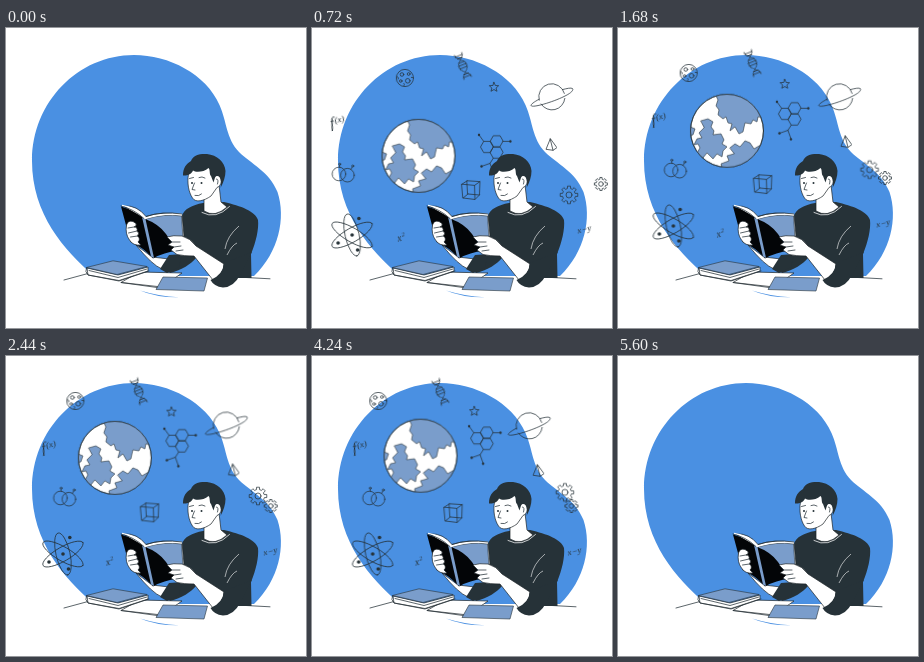
An HTML page that plays this animation: 300x300 px, repeating every 6000 ms.

```html
<!DOCTYPE html>
<html lang="en">
<head>
<meta charset="utf-8">
<title>Reading and imagining</title>
<style>
html, body { margin: 0; width: 100%; height: 100%; overflow: hidden; background: #fff; }
svg { display: block; width: 100vw; height: 100vh; }
.line { fill: none; stroke: #263238; stroke-width: .75; stroke-linecap: round; stroke-linejoin: round; }
.ink { fill: #263238; stroke: none; }
.dark { fill: #263238; }
.black { fill: #030507; }
.skin { fill: #fff; stroke: #1c2327; stroke-width: .7; stroke-linejoin: round; }
.soft { fill: #7a9dcb; stroke: #263238; stroke-width: .6; stroke-linejoin: round; }
text { font-family: "Liberation Serif", "Noto Serif", serif; font-style: italic; fill: #263238; stroke: none; }
.item { animation: fly 6s infinite, fade 6s linear infinite; }
@keyframes fly {
  0% {
    transform: translate(var(--ax), var(--ay)) scale(1);
    animation-timing-function: cubic-bezier(.333, 1, .667, 1);
  }
  25% {
    transform: translate(var(--bx), var(--by)) scale(1);
    animation-timing-function: linear;
  }
  73.33% {
    transform: translate(var(--cx), var(--cy)) scale(1);
    animation-timing-function: cubic-bezier(.333, 0, .667, .333);
  }
  93.33%, 100% { transform: translate(var(--dx), var(--dy)) scale(.36); }
}
@keyframes fade {
  0% { opacity: 0; }
  9%, 83% { opacity: 1; }
  92%, 100% { opacity: 0; }
}
</style>
</head>
<body>
<svg viewBox="0 0 300 300">
  <defs>
    <clipPath id="disc"><circle r="36.5"/></clipPath>
    <path id="hex" d="M6.4 0 3.2 5.6H-3.2L-6.4 0-3.2-5.6H3.2Z"/>
  </defs>

  <path fill="#4a90e2" d="M128 27C163 27 200 46 213.5 77C221 94 220 110 233 124C245 136 263 143 271.5 164C280 190 273 224 248 248H88C58 222 26 186 26 133C26 74 72 27 128 27Z"/>
  <path fill="#4a90e2" d="M134 262.5Q152 268 173 269.3Q150 269.5 134 262.5Z"/>

  <!-- floating ideas: each data-path lists four waypoints -->
  <g class="line">
    <g class="item" data-path="106.5,128 109,103 108.5,99.5 99,82">
      <circle r="36.5" fill="#fff"/>
      <g clip-path="url(#disc)" fill="#7a9dcb" stroke-width=".6">
        <path d="M-12-37 -9-31 -11-25 -8-21 -9-16 -4-12 -1-14 1-8 5-7 3 0 8-4 12 3 16 1 18-8 24-7 26-11 30-9 31-14 40-13V-40Z"/>
        <path d="M3 17 8 13 13 16 18 10 23 12 27 18 34 14 40 15V40H-4L-6 33 2 30 0 25 7 23Z"/>
        <path d="M-26-10 -19-12 -14-9 -16-4 -13 0 -14 4 -6 3 -3 9 -5 13 0 16 -4 20 -5 26 -10 23 -14 28 -20 22 -24 27 -31 24 -27 17 -29 13 -33 14 -30 8 -25 7 -28 2 -23-3Z"/>
        <path d="M-37-4 -32-2 -34 4 -40 5Z"/>
      </g>
      <circle r="36.5"/>
    </g>

    <g class="item" data-path="93,50 71,45 66,45 50,48">
      <circle r="8.6"/>
      <circle cx="-3" cy="-3.5" r="1.8"/><circle cx="3.7" cy="-4" r="1.4"/>
      <circle cx="2.8" cy="2.8" r="2.3"/><circle cx="-4.2" cy="3" r="1.3"/>
      <path d="M-7.8-1.4q2 .6 1.2 2.4M-1 5.4q1 1 0 2.4M6.4-.6l1.2.2"/>
    </g>

    <g class="item" data-path="151,38 135,35 128,36 111,39">
      <g transform="rotate(-22)">
        <path d="M-4-13C-4-6 4-7 4 0S-4 6-4 13M4-13C4-6-4-7-4 0S4 6 4 13"/>
        <path d="M-3.8-11H3.8M-2.5-8.5H2.5M-3-4H3M-4-1.2H4M-3.8 1.8H3.8M-2.5 8.5H2.5M-3.8 11H3.8"/>
      </g>
    </g>

    <g class="item" data-path="182,59 167,56 162,55 153,57">
      <path d="M0-4.7 1.4-1.5 4.7-1.3 2.1 1 3 4.3 0 2.5-3 4.3-2.1 1-4.7-1.3-1.4-1.5Z"/>
    </g>

    <g class="item" data-path="240,69 222,69 217,70 207,71">
      <path d="M-12.8 3.2A13 13 0 1 1 12.4-3.6M-10.9 7A13 13 0 0 0 12.9 1.4"/>
      <path d="M-12.8 2.2C-19 5.5-22 8-20.5 9C-17 10.5 4 4 14-1.5C19-4 22-7 20.5-8.5C19-9.5 15-8.5 10.5-7.4"/>
    </g>

    <g class="item" data-path="24,93 39,90 47,90 57,90">
      <g transform="rotate(-12)">
        <text x="-6.5" y="5.5" font-size="15">f</text>
        <text x="-1.4" y="2.4" font-size="9">(x)</text>
      </g>
    </g>

    <g class="item" data-path="31,146 57,142 62,142 74,143">
      <circle cx="-4.2" cy="0" r="6.8"/><circle cx="4.3" cy="1.2" r="6.8"/>
      <path d="M-3.5-6.8v-2M7.8-4.7l1.3-2.3"/>
      <circle cx="-3.5" cy="-9.8" r="1"/><circle cx="9.6" cy="-8" r="1"/>
    </g>

    <g class="item" data-path="40,207 55,198 61,198 70,197">
      <ellipse rx="23" ry="7" transform="rotate(30)"/>
      <ellipse rx="21.5" ry="7" transform="rotate(77)"/>
      <ellipse rx="23" ry="7" transform="rotate(-30)"/>
      <g class="ink"><circle r="1.8"/><circle cx="6.8" cy="-16.5" r="1.8"/><circle cx="5.5" cy="15" r="1.8"/><circle cx="-14" cy="8" r="1.8"/></g>
    </g>

    <g class="item" data-path="89,209 102,205 107,205 115,207">
      <g transform="rotate(-12)">
        <text x="-4" y="4.2" font-size="9.5">x</text><text x="1" y="-.2" font-size="6">2</text>
      </g>
    </g>

    <g class="item" data-path="180,124 172,91 170,87 160,78">
      <use href="#hex" x="-5.1" y="-4.9"/><use href="#hex" x="4.5" y="-10.5"/><use href="#hex" x="4.5" y=".7"/>
      <path d="M-8.3-10.5-13-17M10.9-10.5H18M1.3 6.3-2 11.5-10.5 14.5M-2 11.5 1 20"/>
      <g class="ink"><circle cx="-13" cy="-17" r="1.2"/><circle cx="18.4" cy="-10.5" r="1.2"/><circle cx="-10.5" cy="14.5" r="1.2"/><circle cx="1" cy="20.5" r="1.2"/></g>
    </g>

    <g class="item" data-path="159,162 145,156 141,157 131,159">
      <path d="M-9-5.8 3.6-4.6 4 9.5-7.8 8ZM-3.8-9.2 9-8.4 8.5 5-3 4ZM-9-5.8-3.8-9.2M3.6-4.6 9-8.4M4 9.5 8.5 5M-7.8 8-3 4"/>
    </g>

    <g class="item" data-path="239,117 228,114 226,115 218,116">
      <path d="M-.8-6-5 4.3 2 5.3 5.6 2.9ZM-.8-6 2 5.3"/>
    </g>

    <g class="item" data-path="257,167 251.5,142 253,136 256,121">
      <path data-gear="8.9"/><circle r="3"/>
    </g>
    <g class="item" data-path="289,156 267.5,150 259,150 243,153">
      <path data-gear="6.6"/><circle r="2.3"/>
    </g>

    <g class="item" data-path="272,201 265,195 262,195 256,198">
      <g transform="rotate(-14)">
        <text x="-7" y="3" font-size="9">x</text><text x="-2.4" y="3" font-size="9">−</text><text x="3.2" y="3" font-size="9">y</text>
      </g>
    </g>
  </g>

  <!-- desk -->
  <path class="line" d="M58 252 82 245.5M142 245.5 160 247M212 248 264 250.8"/>
  <path class="skin" d="M133 244 176 245 156 259 115 254.5Z"/>
  <path class="soft" d="M157 249 201.5 250 198 263 150 261.5Z"/>
  <path class="line" stroke-width=".6" d="M115 254.5 151 259.5"/>

  <!-- closed book -->
  <path class="skin" d="M81 240 112 247 142 239V243L113 252.5 82 247Z"/>
  <path class="soft" d="M80.5 239.5 107 232.8 141 238.5 111 246.5Z"/>
  <path class="line" stroke-width="1" d="M80.5 239.5Q78.5 244 82 247L113 253 143 243"/>
  <path class="line" stroke-width=".6" d="M83 242.5 112 249.5 141 241"/>

  <!-- reader -->
  <path class="dark" d="M197 175C186 177 178 181 176 188L174 224C178 229 171 236 160 239L164 245C176 242 185 236 190 230L212 250H245.5L245 226C250 214 253 201 252 192C249 183 235 178 218 174Z"/>
  <path d="M219 221Q221 208 233 198M221 227Q226 217 231 215" fill="none" stroke="#fff" stroke-width=".6"/>
  <path class="skin" d="M198 167V183Q209 190 221 179L215 174 213 157Z"/>
  <path class="line" stroke="#fff" style="stroke:#fff" d="M196 184.5Q210 192 223.5 178.5"/>
  <path class="skin" d="M182.5 146C181 155 182.5 164 186.5 170C189.5 175 198 173 205 168L211 159.5C216 158 217 149 212 147L206 138 186 138Z"/>
  <path class="dark" d="M177 147.5C177 140 180 136 185 133C187 127 194 125.5 201 126C211 127 219 134 219.5 143C219.5 149 217.5 154 214.5 160C216 154 214.5 147 210.5 148C208.5 149 208.5 152 207.5 154.5L205 148C203 146 204.5 142 202.5 140C198 144 190 145 187 142.5C186 146 181 148 177 147.5Z"/>
  <g class="line" stroke-width=".8">
    <path d="M183.5 150.5 187.5 149.5M193 149.5Q196 148 199 150M188.5 155 186 161.5 189 162M189 167.5Q193 168.5 195.5 166M210.5 151Q213 151 211.5 156"/>
    <circle class="ink" cx="186" cy="155" r="1"/><circle class="ink" cx="195.5" cy="155" r="1"/>
  </g>

  <!-- far forearm -->
  <path class="skin" d="M130 217 146 229 163 231 165 240 156 241Q146 237 130 217Z"/>
  <path class="dark" d="M154 241 163 227 176 226 173 239 161 245Z"/>

  <!-- open book -->
  <path class="skin" d="M118 178Q131 177 140 188.5Q156 183 176 186.5L178 208 162 214 141 196Z"/>
  <path class="soft" d="M140 191Q158 185.5 175.5 188L177 210 162 214Z"/>
  <path class="black" d="M115 178.5Q127 182 138 190.5L147 230.5Q137 219 124.5 214Z"/>
  <path class="black" d="M138 190.5Q153 196 160 206L171.5 223Q158 224 147 230.5Z"/>
  <path fill="#7a9dcb" d="M136 189 139.5 191 148 230 145 228.5Z"/>
  <path d="M116 177.5Q129 179 139 190.5Q157 184.5 176 186.5" fill="none" stroke="#fff" stroke-width="1.3"/>
  <path class="line" stroke-width=".6" d="M115 178Q128 181 138 190.5M140 188.5Q156 183 176 186"/>

  <!-- hands and near forearm -->
  <path class="skin" d="M120.5 197Q122 192 127 193.5L130 195.5Q131 198 128 199Q132 199 131 203Q134 205 131.5 208Q135 211 132 214L135 217Q127 218 123.5 212Q119 206 120.5 197Z"/>
  <path class="line" stroke-width=".6" d="M122 200 128 199M122.5 205 131 203M124.5 209 131.5 208"/>
  <path class="skin" d="M161 209Q167 207 176 208Q184 210 190 218L218 236Q218 246 207 252L188 228Q178 228 171 226.5L165 222 168 219 162 217 166 214Z"/>
  <path class="line" stroke-width=".6" d="M166 214 174 214M168 219 175 218M170 223 177 222"/>
  <path class="dark" d="M218 235 246 224 234 247Q228 259 217 259.5Q208 258.5 204.5 252Q217 247 218 235Z"/>
</svg>
<script>
const lerp = (from, to, k) => from + (to - from) * k;

// The second and third waypoints are the resting drift; the outer two set entry and exit.
for (const item of document.querySelectorAll('.item')) {
  const [early, rest, drift, late] = item.dataset.path.split(' ').map(p => p.split(',').map(Number));
  ['x', 'y'].forEach((axis, i) => {
    const set = (name, value) => item.style.setProperty(`--${name}${axis}`, `${value}px`);
    set('a', lerp(rest[i], early[i], 7.1));
    set('b', rest[i]);
    set('c', drift[i]);
    set('d', lerp(drift[i], late[i], 4.6));
  });
}

for (const gear of document.querySelectorAll('[data-gear]')) {
  const outer = +gear.dataset.gear, inner = outer * .74, teeth = 8;
  const point = (r, a) => `${(r * Math.cos(a)).toFixed(2)} ${(r * Math.sin(a)).toFixed(2)}`;
  const points = [];
  for (let i = 0; i < teeth; i++) {
    const a = i / teeth * Math.PI * 2;
    points.push(point(inner, a - .24), point(outer, a - .17), point(outer, a + .17), point(inner, a + .24));
  }
  gear.setAttribute('d', `M${points.join('L')}Z`);
}
</script>
</body>
</html>
```
